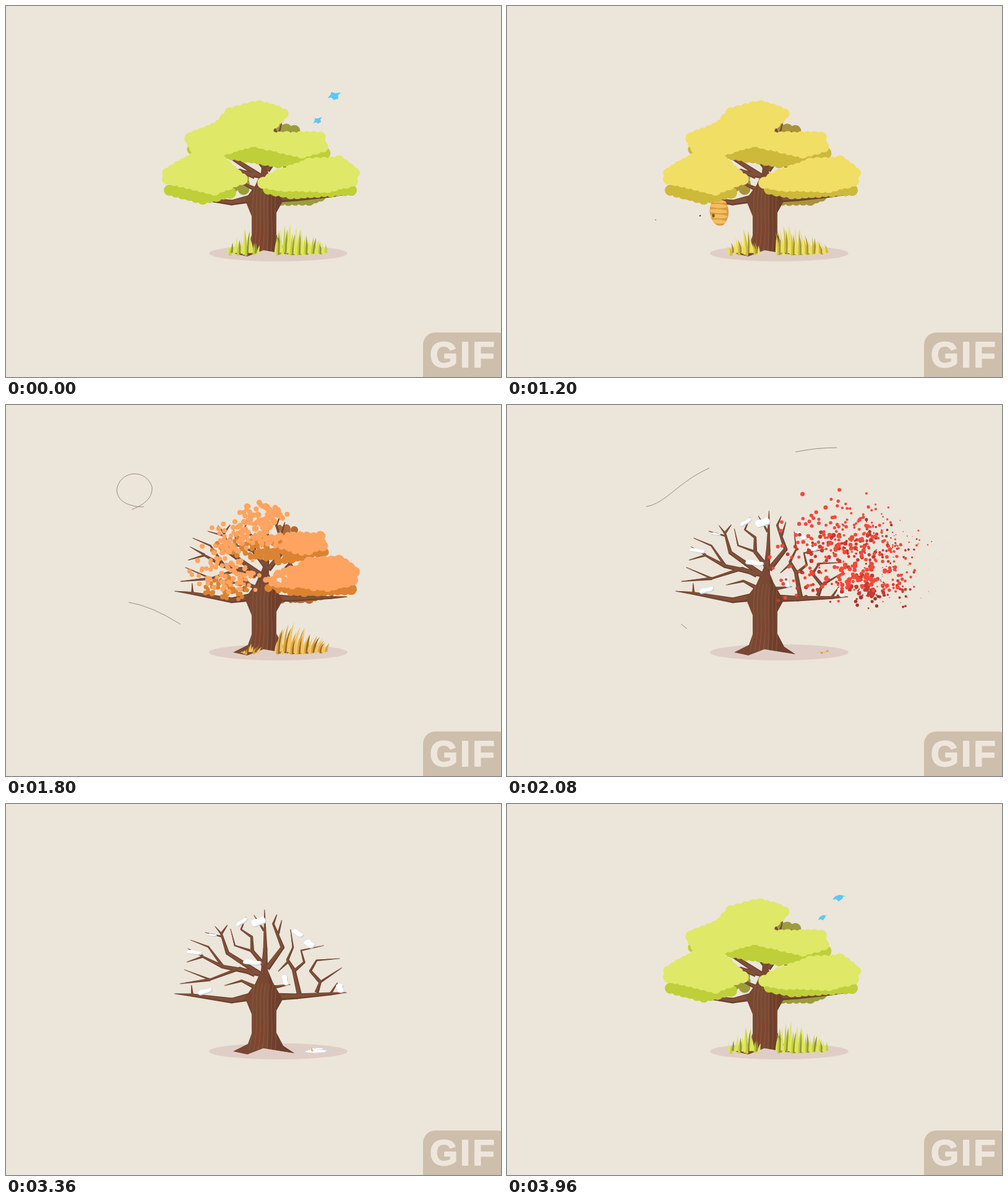
Animation, 800 px wide and 600 px high, one loop 4000 ms. Source, as an HTML page with a canvas:

```html
<!DOCTYPE html>
<html lang="en">
<head>
<meta charset="utf-8">
<title>Seasons tree</title>
<style>
  html, body { margin: 0; width: 100%; height: 100%; overflow: hidden; background: #ece5da; }
  canvas { display: block; }
</style>
</head>
<body>
<canvas id="stage" width="800" height="600"></canvas>
<script>
const ctx = document.getElementById('stage').getContext('2d');
const LOOP = 4000, TAU = Math.PI * 2;

// ---------- helpers ----------
let seed = 7;
const rand = () => (seed = (seed * 16807) % 2147483647) / 2147483647;
const clamp = v => Math.max(0, Math.min(1, v));
const lerp = (a, b, k) => a + (b - a) * k;
const smooth = (a, b, t) => { const k = clamp((t - a) / (b - a)); return k * k * (3 - 2 * k); };
const backOut = k => k <= 0 ? 0 : 1 + 2.2 * (k - 1) ** 3 + 1.2 * (k - 1) ** 2;

// Interpolates rows of [time, ...values].
function key(t, rows) {
  if (t <= rows[0][0]) return rows[0].slice(1);
  for (let i = 1; i < rows.length; i++) {
    const a = rows[i - 1], b = rows[i];
    if (t <= b[0]) return a.slice(1).map((v, j) => lerp(v, b[j + 1], (t - a[0]) / (b[0] - a[0])));
  }
  return rows[rows.length - 1].slice(1);
}
const hexToRgb = hex => [hex >> 16, hex >> 8 & 255, hex & 255];
const pairs = list => list.reduce((out, v, i) => (i % 2 ? out[out.length - 1].push(v) : out.push([v]), out), []);
const polygon = list => new Path2D('M' + list.join(' ') + 'Z');
function disc(x, y, r) { ctx.moveTo(x + r, y); ctx.arc(x, y, r, 0, TAU); }
function ellipse(x, y, rx, ry, color, turn = 0) {
  ctx.fillStyle = color;
  ctx.beginPath();
  ctx.ellipse(x, y, rx, ry, turn, 0, TAU);
  ctx.fill();
}
function scoped(draw) { ctx.save(); draw(); ctx.restore(); }
function scaledAt(x, y, sx, sy, draw) {
  scoped(() => { ctx.translate(x, y); ctx.scale(sx, sy); ctx.translate(-x, -y); draw(); });
}
// White shape with a blue-grey rim on its lower right.
function snowShape(path, dx, dy) {
  scoped(() => {
    ctx.fillStyle = '#c9d4da';
    ctx.fill(path);
    ctx.clip(path);
    ctx.translate(-dx, -dy);
    ctx.fillStyle = '#fff';
    ctx.fill(path);
  });
}
function snowBall(x, y, r) {
  const path = new Path2D();
  path.arc(x, y, r, 0, TAU);
  snowShape(path, r * .3, r * .25);
}

// ---------- colours: summer, late summer, autumn, blown away ----------
const seasonTimes = [600, 1200, 1790, 2060];
const leafTones = {
  light: ['dfe867', 'f0de65', 'ffa862', 'f6483a'],
  dark: ['bfcf39', 'cdb93a', 'dd8632', 'c63a30'],
  back: ['9c9c3b', 'a8933a', 'b06c34', 'a8362c']
};
const grassTones = {
  light: ['dfe55c', 'f0de60', 'f4c465'],
  dark: ['c3d03a', 'cfc03a', 'd9a43a'],
  back: ['93973a', 'a0983a', '96692c']
};
function toneAt(tones, t) {
  const rows = tones.map((hex, i) => [seasonTimes[i], ...hexToRgb(parseInt(hex, 16))]);
  return `rgb(${key(t > 3000 ? 0 : t, rows).map(Math.round)})`;
}

// ---------- foliage: tone and outline through the rim leaves ----------
const clusters = [
  ['back', [440,198, 466,202, 440,207]],
  ['back', [445,314, 490,314, 508,307]],
  ['back', [368,292, 384,296, 384,278]],
  ['dark', [301,232, 365,240, 440,253, 515,238, 500,222, 310,222]],
  ['light', [298,214, 346,193, 362,173, 410,161, 448,174, 425,196, 421,212, 508,212, 512,228, 478,237, 400,219, 350,233, 305,230]],
  ['dark', [264,298, 318,312, 362,302, 340,280]],
  ['light', [261,270, 305,245, 340,244, 381,280, 337,297, 261,280]],
  ['dark', [424,296, 460,303, 558,298, 540,280]],
  ['light', [416,286, 440,273, 490,255, 538,251, 563,270, 560,283, 520,293, 440,291]]
].map(([tone, outline], order) => {
  const points = pairs(outline), path = polygon(outline), leaves = [];
  const addLeaf = (x, y, r) => leaves.push({ x, y, r, speed: .55 + rand() * .9, drift: rand() - .5,
    start: 1550 + (x - 250) * 1.05 + rand() * 100 });
  for (let y = 155, row = 0; y < 325; y += 7.5, row++)
    for (let x = 250 + row % 2 * 4; x < 575; x += 8.5)
      if (ctx.isPointInPath(path, x, y)) addLeaf(x, y, 8.6);
  points.forEach(([x, y], i) => {
    const [nx, ny] = points[(i + 1) % points.length];
    const steps = Math.max(1, Math.round(Math.hypot(nx - x, ny - y) / 11));
    for (let s = 0; s < steps; s++) addLeaf(lerp(x, nx, s / steps), lerp(y, ny, s / steps), 8.5 + rand() * 1.5);
  });
  const mean = i => points.reduce((sum, p) => sum + p[i], 0) / points.length;
  return { tone, leaves, order, cx: mean(0), cy: mean(1) };
});

function drawCluster({ tone, leaves, order, cx, cy }, t) {
  const grow = backOut(clamp((t - 3420 - order * 22) / 300));
  ctx.fillStyle = toneAt(leafTones[tone], t);
  ctx.beginPath();
  for (const leaf of leaves) {
    let { x, y, r } = leaf;
    if (t > 3000) {
      x = lerp(cx, x, grow); y = lerp(cy, y, grow); r *= grow;
    } else {
      const u = Math.max(0, t - leaf.start) / 500;
      x += 330 * leaf.speed * u ** 1.6;
      y += leaf.drift * 75 * u + Math.sin(u * 4 + leaf.drift * 6) * 8 * u;
      r *= (1 - .5 * smooth(leaf.start - 110, leaf.start + 40, t))
        * (1 - clamp(u * leaf.speed / 1.3)) * clamp((2400 - t) / 320);
    }
    if (r > .2) disc(x, y, r);
  }
  ctx.fill();
}

// ---------- branches: [base width, x, y, x, y, ...] ----------
const leftBranches = [
  [13, 394,312, 365,318, 300,309, 272,307], [4, 301,308, 300,293],
  [7, 402,296, 381,286, 353,294],
  [8, 402,276, 378,266, 330,284, 288,268], [5, 330,284, 281,291],
  [9, 408,274, 350,263, 318,247, 292,256], [4, 318,246, 294,234], [5, 350,262, 327,231, 298,220],
  [9, 412,276, 358,241, 348,210, 338,198], [4, 348,210, 358,196], [3, 351,215, 322,208]
];
const rightBranches = [
  [8, 418,262, 398,238, 397,215, 380,203, 388,183], [4, 398,238, 370,229, 363,202],
  [13, 417,285, 419,235, 418,171], [4, 417,205, 401,180],
  [9, 422,266, 447,232, 432,194, 438,179], [4, 440,210, 446,188],
  [7, 428,297, 460,292],
  [13, 430,312, 470,311, 525,307, 551,305], [4, 525,306, 536,289],
  [7, 502,305, 508,288, 543,265], [6, 508,288, 492,270, 502,253, 540,250],
  [8, 474,308, 465,268, 455,252, 464,232, 460,203], [4, 457,254, 440,271],
  [5, 466,270, 482,256, 477,237, 514,229]
];
const trunk = polygon([367,400, 391,388, 397,371, 397,340, 386,313, 403,290, 418,256, 431,288, 447,316, 437,334,
  437,370, 448,391, 466,403, 416,395, 390,405]);

function drawBranch([width, ...coords], color, shrink, shift) {
  const points = pairs(coords), last = points.length - 1;
  const widthAt = i => lerp(width, .7, i / last) * shrink / 2;
  ctx.fillStyle = color;
  ctx.beginPath();
  for (let i = 0; i < last; i++) {
    const [x, y] = points[i], [nx, ny] = points[i + 1], angle = Math.atan2(ny - y, nx - x);
    const a = widthAt(i), b = widthAt(i + 1), sx = -Math.sin(angle), sy = Math.cos(angle);
    ctx.moveTo(x + sx * a + shift, y + sy * a + shift);
    ctx.lineTo(x - sx * a + shift, y - sy * a + shift);
    ctx.lineTo(nx - sx * b + shift, ny - sy * b + shift);
    ctx.lineTo(nx + sx * b + shift, ny + sy * b + shift);
    ctx.closePath();
  }
  ctx.fill();
  ctx.beginPath();
  points.slice(1, -1).forEach(([x, y], i) => disc(x + shift, y + shift, widthAt(i + 1)));
  ctx.fill();
}

function drawBranches() {
  const all = [...leftBranches, ...rightBranches];
  all.forEach(b => drawBranch(b, '#6c402e', 1, 0));
  all.forEach(b => drawBranch(b, '#80503a', .6, -.6));
}

function drawTrunk() {
  scoped(() => {
    ctx.fillStyle = '#784832';
    ctx.fill(trunk);
    ctx.clip(trunk);
    ctx.fillStyle = '#68392999';
    ctx.fill(polygon([425,255, 424,405, 470,405, 450,300]));
    ctx.fillStyle = '#8a402c66';
    ctx.fill(polygon([412,345, 421,362, 414,385, 400,392]));
    ctx.strokeStyle = '#9a674a66';
    ctx.lineWidth = 1.6;
    for (let i = 0; i < 7; i++) {
      const x = 398 + i * 6;
      ctx.beginPath();
      ctx.moveTo(x + 4, 290);
      ctx.bezierCurveTo(x - 4, 325, x + 6, 355, x - 5 + i, 398);
      ctx.stroke();
    }
  });
}

// ---------- snow ----------
const bean = new Path2D('M-1 .2C-1-.8-.5-1 0-.6S1-1 1 0S.5 1 0 .8S-1 1-1 .2Z');
// [x, y, half width, half height, degrees]
const snowCaps = [
  [305,240,21,9,5], [333,212,13,6,5], [381,191,19,9,-45], [408,190,20,17,-35], [398,256,24,11,5],
  [322,303,20,11,-25], [452,285,18,10,75], [472,209,18,10,35], [491,226,16,14,35], [541,298,16,12,70]
].map(([x, y, rx, ry, turn]) => {
  const path = new Path2D();
  path.addPath(bean, new DOMMatrix().translate(x, y).rotate(turn).scale(rx, ry));
  return { path, x, y };
});

function drawSnowCaps(t) {
  const [size] = key(t, [[1980, 0], [2080, .62], [2500, 1], [2900, 1], [3360, .62], [3520, 0]]);
  if (size > 0) for (const { path, x, y } of snowCaps)
    scaledAt(x, y, size, size ** 1.5, () => snowShape(path, 2.5, 3));
}

// [x, height at 2640 ms, landing height]
const flakes = [[332,7,208], [521,16,395], [452,67,272], [470,107,205], [349,139,300], [525,194,395], [291,226,236],
  [410,-80,180]];
function drawFlakes(t) {
  for (const [x, y0, land] of flakes) {
    const y = y0 + (t - 2640) * .6;
    if (y > -5 && y < land) snowBall(x, y, 4.3);
  }
}

function drawSnowman(t) {
  const melt = smooth(2900, 3340, t);
  const size = backOut(clamp((t - 2320) / 260)) * (1 - smooth(3370, 3500, t));
  if (size <= 0) return;
  scaledAt(501, 403, size * lerp(1, .87, melt), size * lerp(1, .12, melt), () => {
    snowBall(504.5, 380.5, 23.2);
    snowBall(504, 347.5, 14.3);
    ellipse(493, 343, 1.3, 1.4, '#222');
    ellipse(499, 343, 1.3, 1.4, '#222');
  });
  const noseSize = size * lerp(1, .45, melt);
  scoped(() => {
    ctx.translate(lerp(497, 495, melt), lerp(403 - 53.5 * size, 400, melt));
    ctx.rotate(melt * 1.4);
    ctx.scale(noseSize, noseSize);
    ctx.fillStyle = '#f7931e';
    ctx.fill(polygon([-15,2.5, -1,-3, 1,0, -1,2.5]));
  });
}

// ---------- grass ----------
const blades = Array.from({ length: 46 }, (_, i) => {
  const left = i < 16, x = left ? 359 + i * 3.2 : 436 + (i - 16) * 2.8;
  const peak = left ? 388 : 460, spread = left ? 16 : 34;
  return { x, y: 399 + rand() * 5, tone: ['light', 'dark', 'back', 'light'][i % 4], bend: rand() * 6 - 2,
    h: (14 + (left ? 28 : 38) * Math.exp(-(((x - peak) / spread) ** 2))) * (.6 + .45 * rand()) };
});
function drawGrass(t) {
  const [lean] = key(t, [[600, 0], [1200, -4], [1800, 6], [2100, 9], [3400, 0]]);
  for (const { x, y, tone, bend, h } of blades) {
    const start = 1650 + (x - 358) * 2.2;
    const size = t > 3000 ? backOut(clamp((t - 3450 - (x - 358)) / 260)) : 1 - smooth(start, start + 120, t);
    if (size <= 0) continue;
    const tip = x + (bend + lean) * size;
    ctx.fillStyle = toneAt(grassTones[tone], t);
    ctx.beginPath();
    ctx.moveTo(x - 2.2, y);
    ctx.quadraticCurveTo(x - 1.5, y - h * size * .6, tip, y - h * size);
    ctx.quadraticCurveTo(x + 2.2, y - h * size * .5, x + 2.2, y);
    ctx.fill();
  }
}

// ---------- birds, hive, bees ----------
const birdPaths = [
  [[-260, 470, 212], [-140, 541, 184], [-40, 537, 151], [0, 531, 145], [140, 510, 137], [420, 440, 180]],
  [[-260, 460, 222], [-130, 522, 197], [-40, 510, 183], [0, 504, 185], [340, 445, 184]]
];
function drawBirds(t) {
  const time = t > 2000 ? t - LOOP : t;
  if (time < -260 || time > 420) return;
  birdPaths.forEach((path, i) => {
    const [x, y] = key(time, path), flap = Math.cos(time / 32), size = i ? .75 : 1;
    scoped(() => {
      ctx.translate(x, y);
      ctx.scale(size, size);
      ctx.rotate(i ? -.25 : 0);
      ctx.fillStyle = '#5cc8f5';
      ctx.fill(polygon([-11,4, -6,-2, -5,-6 * flap, 1,-4, 11,-5 * flap, 6,-1, 6,5 * flap, -1,7, -5,3]));
    });
  });
}

function drawHive(t) {
  const size = backOut(clamp((t - 880) / 240)) * (1 - smooth(1540, 1680, t));
  if (size <= 0 || t > 1700) return;
  scaledAt(343, 314, size, size, () => {
    const shell = new Path2D('M331 316Q343 310 354 317Q364 338 350 354Q343 357 337 353Q322 338 331 316Z');
    ctx.fillStyle = '#dc9a3c';
    ctx.fill(shell);
    ctx.clip(shell);
    for (let i = 0; i < 5; i++) ellipse(341, 315 + i * 8.4, 15, 3.3, '#f2bf60', .06);
    ellipse(333.5, 339, 2.2, 3, '#8a5420');
  });
}

function drawBees(t) {
  if (t < 1145 || t > 1560) return;
  const near = key(t, [[1145, 296, 336, .4], [1200, 312, 339, 1.5], [1290, 316, 352, 1.5], [1360, 333, 339, 0]]);
  const far = key(t, [[1145, 216, 340, .2], [1200, 240, 346, .8], [1340, 280, 330, 1.5], [1560, 333, 339, 0]]);
  for (const [x, y, r] of [near, far]) ellipse(x, y, r, r * .7, '#3a2f22', -.4);
}

// ---------- wind: each gust shows its path between a tail and a head distance ----------
function drawGust(t, d, tail, head) {
  const [from] = key(t, tail), [to] = key(t, head);
  if (to - from < .5) return;
  ctx.setLineDash([to - from, 2000]);
  ctx.lineDashOffset = -from;
  ctx.stroke(new Path2D(d));
}
function drawWind(t) {
  scoped(() => {
    ctx.strokeStyle = '#958c7a';
    ctx.lineWidth = 1;
    drawGust(t, 'M123 187Q165 184 203 169C225 161 237 149 236 133A29 29 0 0 0 179 138C181 156 196 161 210 164C250 171 270 127 327 102',
      [[1700, 0], [1800, 82], [2080, 274], [2240, 409]], [[1520, 0], [1680, 175], [1800, 272], [2080, 409]]);
    drawGust(t, 'M140 316Q170 314 198 319Q235 325 281 354L291 362',
      [[1700, 0], [1800, 58], [2080, 149], [2140, 163]], [[1620, 0], [1817, 163]]);
    drawGust(t, 'M400 95Q433 81 466 76Q500 69 533 69Q568 70 610 79',
      [[1960, 0], [2080, 69], [2640, 204], [2700, 215]], [[1900, 0], [2080, 136], [2200, 215]]);
  });
}

function drawBadge() {
  ctx.fillStyle = '#cebeac';
  ctx.beginPath();
  ctx.roundRect(674, 528, 140, 90, 20);
  ctx.fill();
  ctx.fillStyle = ctx.strokeStyle = '#eee6dc';
  ctx.lineWidth = 2;
  ctx.lineJoin = 'round';
  ctx.font = 'bold 58px "Liberation Sans", Arial, sans-serif';
  ctx.letterSpacing = '4px';
  ctx.fillText('GIF', 685, 584);
  ctx.strokeText('GIF', 685, 584);
}

function draw(t) {
  const [sway] = key(t, [[1560, 0], [1720, .04], [2080, .04], [2320, 0]]);
  const swaying = part => scoped(() => {
    ctx.translate(416, 315);
    ctx.rotate(sway);
    ctx.translate(-416, -315);
    part(t);
  });
  ctx.fillStyle = '#ece5da';
  ctx.fillRect(0, 0, 800, 600);
  ellipse(440, 400, 112, 13, '#dfcec7');
  drawBirds(t);
  clusters.slice(0, 3).forEach(c => drawCluster(c, t));
  swaying(drawBranches);
  drawTrunk();
  swaying(drawSnowCaps);
  drawHive(t);
  clusters.slice(3).forEach(c => drawCluster(c, t));
  drawGrass(t);
  drawSnowman(t);
  drawFlakes(t);
  drawBees(t);
  drawWind(t);
  drawBadge();
}

const begin = performance.now();
function tick() {
  draw((performance.now() - begin) % LOOP);
  requestAnimationFrame(tick);
}
tick();
</script>
</body>
</html>
```
